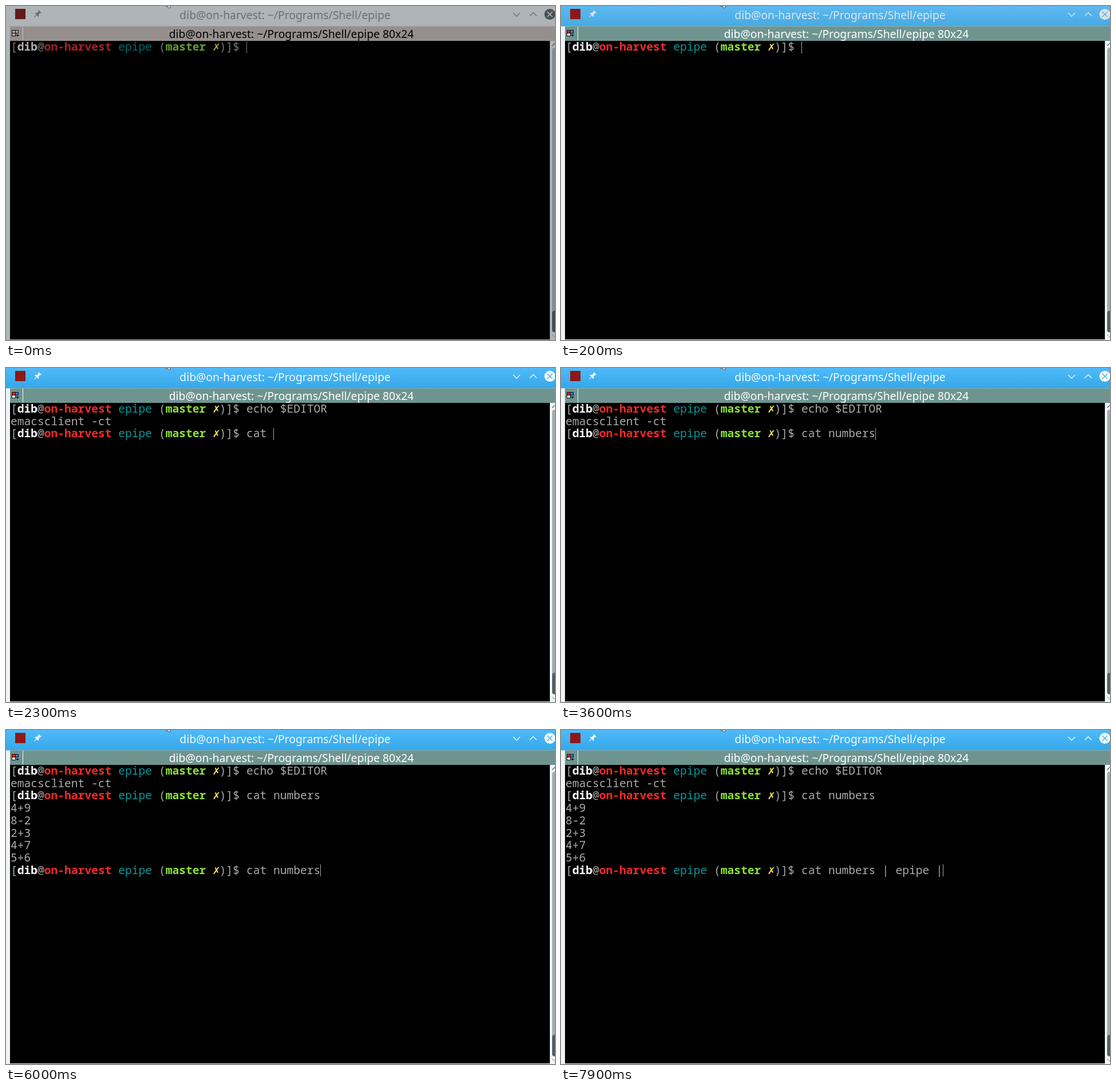
Animation, 959 px wide and 584 px high, one loop 8 s. Source, as an HTML page:

```html
<!DOCTYPE html>
<html lang="en">
<head>
<meta charset="utf-8">
<title>Terminal</title>
<style>
  html, body { margin: 0; width: 100%; height: 100%; overflow: hidden; background: #000; }
  svg { display: block; width: 959px; height: 584px; }
  text { white-space: pre; }
  .title { font: 19.3px "Noto Sans", "Open Sans", sans-serif; text-anchor: middle; }
  .term { font: 19.6px "Noto Sans Mono", "DejaVu Sans Mono", monospace; fill: var(--grey); }
  .bold { font-weight: 700; }
  .cross { font: 700 17px "DejaVu Sans", sans-serif; text-anchor: middle; }
  .line { fill: none; stroke-width: 1.3; }
</style>
</head>
<body>
<svg id="stage" viewBox="0 0 959 584">
  <defs>
    <linearGradient id="bar" x2="0" y2="1">
      <stop offset="0" stop-color="var(--barTop)"/>
      <stop offset="1" stop-color="var(--barEnd)"/>
    </linearGradient>
  </defs>
  <rect width="959" height="584" fill="var(--frame)"/>

  <!-- Title bar -->
  <rect width="959" height="35.5" fill="url(#bar)"/>
  <rect x="16" y="5" width="18" height="18" fill="var(--icon)"/>
  <g transform="translate(55 14) rotate(45)" fill="var(--title)">
    <path d="M-3-6.5h6v1.5h-1v4l2.5 2.5v1h-9v-1L-2-1v-4h-1z"/>
    <rect x="-.6" y="2" width="1.2" height="6"/>
  </g>
  <text class="title" x="487.5" y="22.5" fill="var(--title)">dib@on-harvest: ~/Programs/Shell/epipe</text>
  <g class="line" stroke="var(--title)">
    <path d="M886 12l6 6 6-6M915 17.5l6-6 6 6"/>
  </g>
  <circle cx="950" cy="14.5" r="9.6" fill="var(--close)"/>
  <path class="line" d="M945.5 10l9 9m0-9l-9 9" stroke="var(--closeX)"/>
  <path d="M279 0L285 3.4L287.5 2.2L287 0z" fill="#fff" stroke="#333" stroke-width=".9"/>

  <!-- Terminal header -->
  <rect x="7" y="35.5" width="952" height="25.5" fill="var(--tab)"/>
  <rect x="29" y="36" width="1" height="24" fill="var(--rule)"/>
  <rect x="10" y="42" width="12" height="11" fill="#111"/>
  <rect x="11" y="43" width="5" height="4" fill="var(--cellA)"/>
  <rect x="17" y="43" width="4" height="4" fill="var(--cellB)"/>
  <rect x="11" y="48" width="5" height="4" fill="var(--cellC)"/>
  <rect x="17" y="48" width="6" height="6" fill="var(--tab)"/>
  <path d="M17 50h6l-3 3.5z" fill="#111"/>
  <text class="title" x="498.5" y="55.8" fill="var(--tabText)">dib@on-harvest: ~/Programs/Shell/epipe 80x24</text>

  <!-- Screen and scrollbar -->
  <rect x="7" y="61" width="943" height="522" fill="#000"/>
  <rect x="954" y="73" width="9" height="498" rx="4" fill="var(--groove)"/>
  <rect x="954" y="533" width="9" height="37" rx="4" fill="var(--thumb)"/>
  <path class="line" d="M954 69.5l5-4.5 5 4.5" stroke="var(--thumb)"/>
  <path class="line" d="M954 575l5 4.5 5-4.5" stroke="var(--groove)"/>
  <g id="screen"></g>
  <rect id="cursor" width="1" height="21" fill="var(--grey)"/>
</svg>
<script>
const LOOP = 8000, LEFT = 8, CELL = 11.77, ROW = 21.72, PROMPT = 35;
const NS = "http://www.w3.org/2000/svg";
const stage = document.getElementById("stage");
const screenBox = document.getElementById("screen");
const cursor = document.getElementById("cursor");

// Colours as [dimmed, focused], grouped by how they change.
const barColors = {
  barTop: ["#afb5b8", "#50bafa"], barEnd: ["#adb3b6", "#34a8e8"],
  title: ["#697074", "#f3faff"], close: ["#4b5256", "#f3faff"], closeX: ["#c0c6c9", "#40aeea"]
};
const windowColors = {
  frame: ["#afb4b6", "#f0f4f5"], icon: ["#641919", "#8f1717"],
  groove: ["#858b8e", "#a5abae"], thumb: ["#43494d", "#565d61"],
  grey: ["#777777", "#aaaaaa"], white: ["#b4b4b4", "#ffffff"], red: ["#a92020", "#f42929"],
  teal: ["#006868", "#06989a"], green: ["#629f2b", "#8ae234"], yellow: ["#b1a337", "#fce94f"]
};
const tabColors = {
  tab: ["#958f8d", "#6f9490"], tabText: ["#000000", "#ffffff"], rule: ["#c4c2c1", "#f2f7f6"],
  cellA: ["#a7a3a1", "#ed1c1c"], cellB: ["#a7a3a1", "#247de0"], cellC: ["#a7a3a1", "#ffffff"]
};

// Each entry: time, row, text typed so far on that row.
const typed = [[0, 0, ""]];
function type(row, steps) {
  for (const [time, text] of steps) typed.push([time, row, text]);
}
function typeKeys(row, start, keys, times) {
  times.forEach((time, i) => typed.push([time, row, start + keys.slice(0, i + 1)]));
}
type(0, [[700, "e"], [1000, "ech"], [1100, "echo"], [1400, "echo "], [1600, "echo $ED"], [1800, "echo $EDITOR"]]);
type(2, [[2000, ""], [2200, "ca"], [2300, "cat "]]);
typeKeys(2, "cat ", "numbers", [2500, 2700, 2800, 3000, 3100, 3300, 3600]);
type(8, [[3800, ""]]);
typeKeys(8, "", "cat num", [4300, 4400, 4600, 4800, 5000, 5200, 5300]);
type(8, [[5500, "cat numb"], [5700, "cat number"]]);
typeKeys(8, "cat number", "s |", [6000, 6100, 6300]);
typeKeys(8, "cat numbers |", " epipe |", [6600, 6700, 6900, 7000, 7200, 7500, 7700, 7900]);

const prompt = [
  [0, "[", "grey"], [1, "dib", "white", "bold"], [4, "@", "grey"],
  [5, "on-harvest", "red", "bold"], [16, "epipe", "teal"], [22, "(", "grey"],
  [23, "master", "green", "bold"], [30.55, "✗", "yellow", "cross"], [31, ")]$", "grey"]
];

function addText(parent, row, col, text, color = "grey", style = "") {
  const node = document.createElementNS(NS, "text");
  node.setAttribute("class", "term " + style);
  node.setAttribute("x", LEFT + col * CELL);
  node.setAttribute("y", 78 + row * ROW);
  node.style.fill = `var(--${color})`;
  node.textContent = text;
  parent.append(node);
  return node;
}

function addRow(time) {
  const group = document.createElementNS(NS, "g");
  screenBox.append(group);
  rows.push({ time, group });
  return group;
}

const rows = [], inputs = {};
for (const [time, row] of [[0, 0], [2000, 2], [3800, 8]]) {
  const group = addRow(time);
  for (const [col, ...part] of prompt) addText(group, row, col, ...part);
  inputs[row] = addText(group, row, PROMPT, "");
}
addText(addRow(2000), 1, 0, "emacsclient -ct");
["4+9", "8-2", "2+3", "4+7", "5+6"].forEach((sum, i) => addText(addRow(3800), 3 + i, 0, sum));

function mix(from, to, p) {
  const channel = (hex, i) => parseInt(hex.slice(1 + 2 * i, 3 + 2 * i), 16);
  const rgb = [0, 1, 2].map(i => Math.round(channel(from, i) * (1 - p) + channel(to, i) * p));
  return `rgb(${rgb})`;
}

function paint(colors, p) {
  for (const name in colors) stage.style.setProperty("--" + name, mix(...colors[name], p));
}

function draw(t) {
  const step = Math.min(3, Math.floor(t / 100));
  paint(barColors, [0, 0.45, 0.85, 1][step]);
  paint(windowColors, [0, 0.6, 1, 1][step]);
  paint(tabColors, step ? 1 : 0);

  for (const { time, group } of rows) group.style.display = t >= time ? "" : "none";
  let last;
  for (const entry of typed) {
    if (entry[0] > t) break;
    last = entry;
    inputs[entry[1]].textContent = entry[2];
  }
  const [, row, text] = last;
  cursor.setAttribute("x", Math.round(LEFT + (PROMPT + text.length) * CELL));
  cursor.setAttribute("y", Math.round(61.5 + row * ROW));
}

function tick() {
  draw(performance.now() % LOOP);
  requestAnimationFrame(tick);
}
tick();
</script>
</body>
</html>
```
